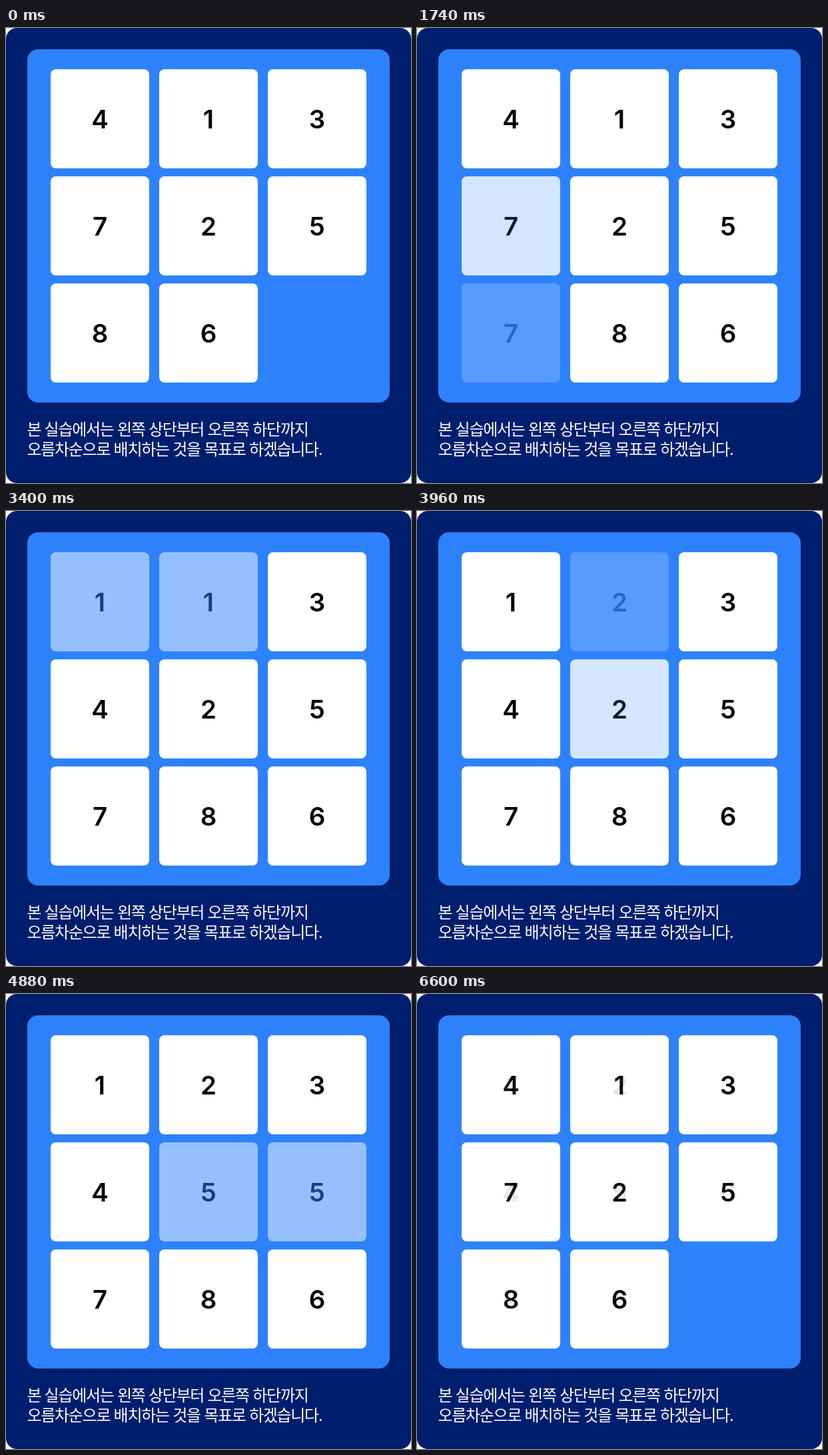
An HTML page with a canvas for the animation above (6660 ms loop, 608 by 684 pixels).

```html
<!DOCTYPE html>
<html lang="ko">
<head>
<meta charset="utf-8">
<title>8 퍼즐</title>
<style>
  html, body { margin: 0; width: 100%; height: 100%; overflow: hidden; background: #fff; }
  canvas { display: block; }
</style>
</head>
<body>
<canvas id="stage" width="608" height="684"></canvas>
<script>
const W = 608, H = 684;
const NAVY = '#001e6e', BLUE = '#2d82fc';
const HOLD = 200, STEP = 60, STEPS = 10;
const PERIOD = HOLD + (STEPS - 1) * STEP;
const CAPTION = ['본 실습에서는 왼쪽 상단부터 오른쪽 하단까지', '오름차순으로 배치하는 것을 목표로 하겠습니다.'];

// Each move slides the tile at the given cell into the gap.
const START = [4, 1, 3, 7, 2, 5, 8, 6, 0];
const MOVES = [7, 6, 3, 0, 1, 4, 5, 8];

function buildBoards() {
  const boards = [START];
  let gap = START.indexOf(0);
  for (const cell of MOVES) {
    const next = boards[boards.length - 1].slice();
    next[gap] = next[cell];
    next[cell] = 0;
    gap = cell;
    boards.push(next);
  }
  return boards;
}

function box(ctx, x, y, w, h, r, color) {
  ctx.fillStyle = color;
  ctx.beginPath();
  ctx.roundRect(x, y, w, h, r);
  ctx.fill();
}

function drawTile(ctx, digit, cell) {
  const x = 67 + 163 * (cell % 3), y = 62 + 161 * Math.floor(cell / 3);
  box(ctx, x, y, 148, 149, 8, '#fff');
  ctx.fillStyle = '#000';
  ctx.fillText(digit, x + 74, y + 88.5);
}

function drawCaption(ctx) {
  ctx.font = '500 24px "Noto Sans CJK KR", "Noto Sans CJK", sans-serif';
  ctx.textAlign = 'left';
  ctx.letterSpacing = '-1.28px';
  ctx.wordSpacing = '1.28px';
  ctx.fillStyle = '#fff';
  CAPTION.forEach((line, i) => ctx.fillText(line, 31.4, 612 + 30 * i));
}

function renderBoard(board) {
  const canvas = document.createElement('canvas');
  canvas.width = W;
  canvas.height = H;
  const ctx = canvas.getContext('2d');
  ctx.fillStyle = '#fff';
  ctx.fillRect(0, 0, W, H);
  box(ctx, 0, 0, W, H, 16, NAVY);
  box(ctx, 32, 32, 544, 531, 16, BLUE);
  ctx.font = '600 38.5px Inter, sans-serif';
  ctx.textAlign = 'center';
  board.forEach((digit, cell) => digit && drawTile(ctx, digit, cell));
  drawCaption(ctx);
  return canvas;
}

const scenes = buildBoards().map(renderBoard);
const stage = document.getElementById('stage').getContext('2d');

function draw(now) {
  const t = now % (PERIOD * scenes.length);
  const index = Math.floor(t / PERIOD);
  const elapsed = t % PERIOD - HOLD;
  const mix = elapsed < 0 ? 0 : (Math.floor(elapsed / STEP) + 1) / STEPS;

  stage.globalAlpha = 1;
  stage.drawImage(scenes[index], 0, 0);
  stage.globalAlpha = mix;
  stage.drawImage(scenes[(index + 1) % scenes.length], 0, 0);
}

let origin;
function tick(now) {
  origin ??= now;
  draw(now - origin);
  requestAnimationFrame(tick);
}
draw(0);
requestAnimationFrame(tick);
</script>
</body>
</html>
```
